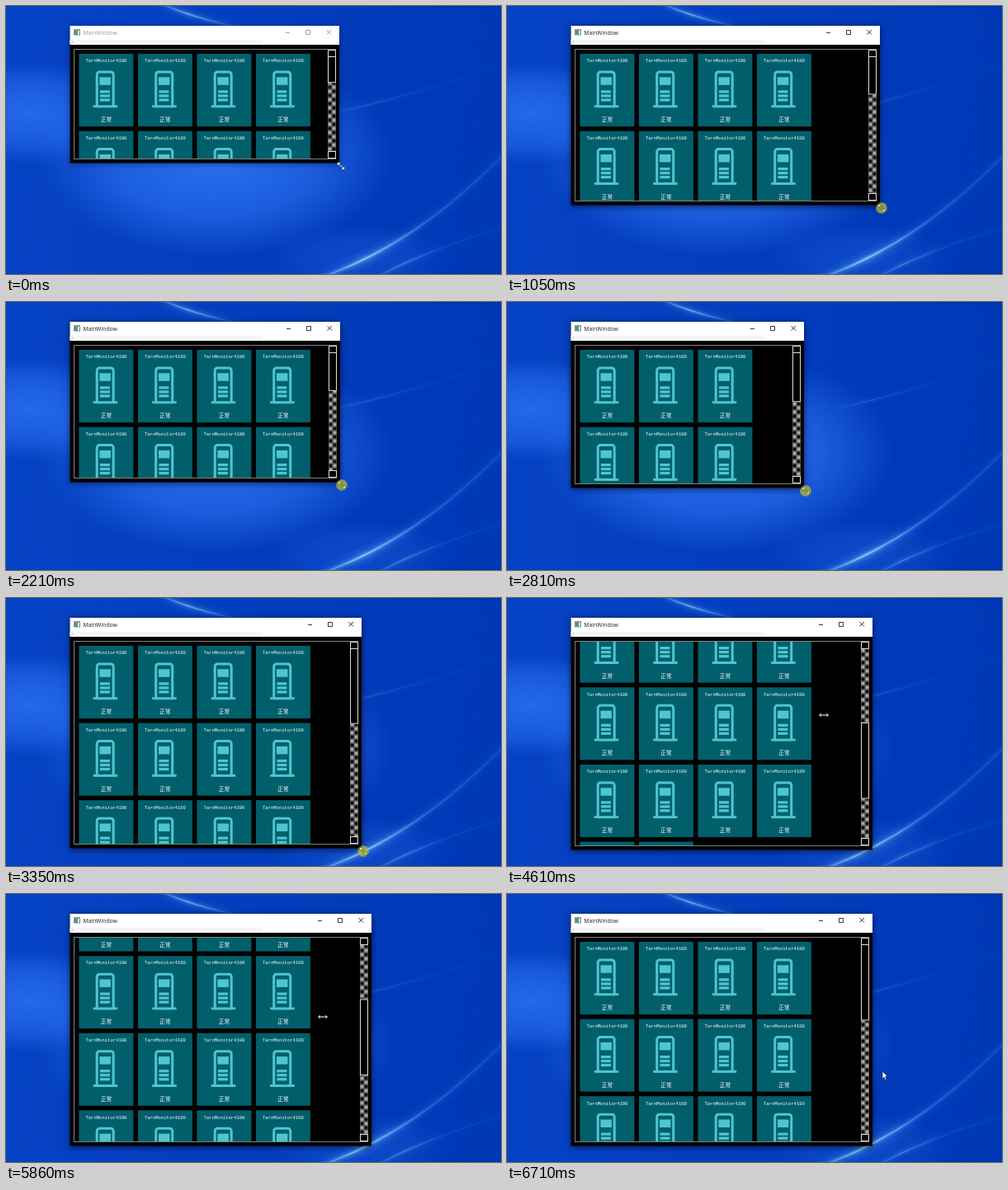
These frames come from a looping animation (600 by 325 pixels, 7170 ms). An HTML page with a canvas:

```html
<!DOCTYPE html>
<html lang="en">
<head>
<meta charset="utf-8">
<title>MainWindow</title>
<style>
  html, body { margin: 0; width: 100%; height: 100%; overflow: hidden; background: #0640c8; }
  canvas { display: block; }
</style>
</head>
<body>
<canvas id="stage" width="600" height="325"></canvas>
<script>
const LOOP = 7170, STEP = 76.6, PHASE = 52;
const LEFT = 77.5, TOP = 24, TILES = 22, PITCH_X = 71.5, PITCH_Y = 93.6, MAX_SCROLL = 352;
const PRESS = 664, RELEASE = 3592;
const ctx = document.getElementById('stage').getContext('2d');

const sampled = t => Math.max(0, PHASE + STEP * Math.floor((t - PHASE) / STEP));

function ramp(t, from, to) {
  const u = Math.min(1, Math.max(0, (t - from) / (to - from)));
  return u * u * (3 - 2 * u);
}

// Dragging the corner: out, back in, out again.
const windowRight = t => Math.floor(
  404.5 + 115.5 * ramp(t, 560, 1660) - 171 * ramp(t, 1824, 2430) + 94.5 * ramp(t, 2600, 3565));
const windowBottom = t => Math.round(
  190 + 94 * ramp(t, 560, 1480) - 98 * ramp(t, 1824, 2430) + 119 * ramp(t, 2430, 3425));
const scrollAt = t => MAX_SCROLL * (ramp(t, 4000, 4945) - ramp(t, 5480, 6100));
const pageRatio = t => .28 + .122 * ramp(t, 1824, 2700);

function pointerAt(t) {
  const enter = ramp(t, RELEASE, 4290), nudge = ramp(t, 4920, 5140), leave = ramp(t, 6470, 6639);
  return [442 - 58 * enter + 71 * leave, 308 - 166 * enter + 7 * nudge + 66 * leave];
}

function layer(w, h, paint) {
  const c = document.createElement('canvas');
  c.width = w;
  c.height = h;
  paint(c.getContext('2d'));
  return c;
}

function box(x, y, w, h, color, g = ctx) {
  g.fillStyle = color;
  g.fillRect(x, y, w, h);
}

function frame(x, y, w, h, color) {
  ctx.strokeStyle = color;
  ctx.lineWidth = 1;
  ctx.strokeRect(x, y, w, h);
}

function label(text, x, y, font, color, align = 'center') {
  ctx.font = font;
  ctx.fillStyle = color;
  ctx.textAlign = align;
  ctx.fillText(text, x, y);
}

const wallpaper = layer(600, 325, g => {
  const base = g.createLinearGradient(0, 0, 600, 60);
  base.addColorStop(0, '#0643c4');
  base.addColorStop(1, '#0038b6');
  box(0, 0, 600, 325, base, g);

  function glow(x, y, rx, ry, alpha) {
    g.save();
    g.translate(x, y);
    g.scale(rx, ry);
    const r = g.createRadialGradient(0, 0, 0, 0, 0, 1);
    r.addColorStop(0, `rgba(50,122,250,${alpha})`);
    r.addColorStop(.6, `rgba(50,122,250,${alpha * .6})`);
    r.addColorStop(1, 'rgba(50,122,250,0)');
    box(-1, -1, 2, 2, r, g);
    g.restore();
  }
  glow(255, 182, 215, 122, .85);
  glow(30, 130, 130, 62, .7);
  glow(430, 305, 110, 40, .25);

  function streak(x0, y0, cx, cy, x1, y1, width, alpha) {
    const c = g.createLinearGradient(x0, y0, x1, y1);
    c.addColorStop(0, `rgba(110,190,255,${alpha * .5})`);
    c.addColorStop(.2, `rgba(150,220,255,${alpha})`);
    c.addColorStop(.55, `rgba(70,150,255,${alpha * .4})`);
    c.addColorStop(1, `rgba(60,140,255,${alpha * .2})`);
    g.strokeStyle = c;
    g.lineCap = 'round';
    for (const k of [11, 6, 3, 1]) {
      g.globalAlpha = k > 1 ? .9 / k : 1;
      g.lineWidth = width * k;
      g.beginPath();
      g.moveTo(x0, y0);
      g.quadraticCurveTo(cx, cy, x1, y1);
      g.stroke();
    }
    g.globalAlpha = 1;
  }
  streak(385, 328, 500, 287, 605, 178, 1.8, .85);
  streak(450, 328, 520, 292, 605, 268, 1, .35);
  streak(190, -2, 255, 26, 350, 36, 1.4, .6);
  streak(400, 129, 480, 112, 605, 70, 1, .14);
});

const checker = ctx.createPattern(layer(10, 10, g => {
  const wave = v => Math.sin((v + .5) * Math.PI / 5);
  for (let x = 0; x < 10; x++)
    for (let y = 0; y < 10; y++) {
      const v = 90 + 100 * wave(x) * wave(y);
      box(x, y, 1, 1, `rgb(${v},${v},${v})`, g);
    }
}), 'repeat');

function drawTile(x, y) {
  const teal = '#005f6b', cyan = '#4fc6cf';
  box(x, y, 66, 88, teal);
  label('TarnMonitor4100', x + 33, y + 10.3, '5.55px "Liberation Mono", monospace', '#fff');
  label('正常', x + 33, y + 82, '500 6.6px "Noto Sans CJK SC", "Noto Sans CJK", sans-serif', '#fff');
  ctx.strokeStyle = cyan;
  ctx.lineWidth = 3;
  ctx.beginPath();
  ctx.roundRect(x + 21.8, y + 22, 20, 44, 3);
  ctx.stroke();
  box(x + 17.3, y + 62.3, 29.5, 3, cyan);
  box(x + 17.3, y + 65.3, 29.5, 3, teal);
  box(x + 25, y + 28.3, 13.5, 9.5, cyan);
  for (let i = 0; i < 3; i++) box(x + 25.5, y + 44.3 + i * 5, 12, 3.3, cyan);
}

function drawTitleBar(right, active) {
  const ink = active ? '#222' : '#999';
  box(LEFT, TOP, right - LEFT, 23, '#fff');
  box(LEFT, 41, Math.min(right, 311) - LEFT, 5.5, '#f5f7f7');
  box(80, 43, 1.5, 1, '#aaa');
  box(82, 28, 8, 7.5, '#8a9599');
  box(83, 30, 3.5, 4.5, '#3f9c98');
  box(87, 30, 2, 4.5, '#dfe6e8');
  label('MainWindow', 93.2, 34.7, '6.85px "Open Sans", sans-serif', ink, 'left');
  ctx.strokeStyle = ink;
  ctx.lineWidth = .9;
  ctx.beginPath();
  ctx.moveTo(right - 65, 32.5);
  ctx.lineTo(right - 60, 32.5);
  ctx.rect(right - 40.5, 29.5, 5, 5);
  ctx.moveTo(right - 15.5, 29);
  ctx.lineTo(right - 10, 34.5);
  ctx.moveTo(right - 10, 29);
  ctx.lineTo(right - 15.5, 34.5);
  ctx.stroke();
}

function drawScrollBar(x, bottom, ratio, scroll) {
  const start = 61, track = bottom - 9 - start;
  const thumb = track * ratio;
  const y = start + (track - thumb) * scroll / MAX_SCROLL;
  ctx.save();
  ctx.translate(x, start);
  box(0, 0, 10, track, checker);
  ctx.restore();
  for (const [top, h] of [[53, 9], [y, thumb], [bottom - 9, 9]]) {
    box(x, top, 10, h, '#000');
    frame(x + .5, top + .5, 9, h - 1, '#ddd');
  }
}

function drawWindow(right, bottom, ratio, scroll, active) {
  ctx.save();
  ctx.shadowColor = `rgba(0,0,30,${active ? .65 : .4})`;
  ctx.shadowBlur = 8;
  ctx.shadowOffsetY = 1;
  box(LEFT, TOP, right - LEFT, bottom - TOP + .5, '#000');
  ctx.restore();
  drawTitleBar(right, active);

  const cols = Math.max(1, Math.floor((right - 97.4) / PITCH_X));
  ctx.save();
  ctx.beginPath();
  ctx.rect(83, 53, right - 98, bottom - 58);
  ctx.clip();
  for (let i = 0; i < TILES; i++)
    drawTile(88.4 + i % cols * PITCH_X, 58 + Math.floor(i / cols) * PITCH_Y - scroll);
  ctx.restore();
  frame(82.5, 52.5, right - 87, bottom - 57, '#7c8284');
  drawScrollBar(right - 14, bottom - 5, ratio, scroll);
}

function drawResizer(x, y, angle, color) {
  const reach = 5.3;
  ctx.save();
  ctx.translate(x, y);
  ctx.rotate(angle);
  ctx.beginPath();
  for (const s of [-1, 1]) {
    ctx.moveTo(0, 0);
    ctx.lineTo(s * reach, 0);
    ctx.moveTo(s * (reach - 2), -1.8);
    ctx.lineTo(s * reach, 0);
    ctx.lineTo(s * (reach - 2), 1.8);
  }
  for (const [w, c] of [[2, 'rgba(17,17,17,.7)'], [1, color]]) {
    ctx.lineWidth = w;
    ctx.strokeStyle = c;
    ctx.stroke();
  }
  ctx.restore();
}

function drawArrow(x, y) {
  ctx.beginPath();
  ctx.moveTo(x, y);
  for (const [dx, dy] of [[0, 9], [2, 7.2], [3.5, 10.5], [5, 9.8], [3.6, 6.6], [6.2, 6.3]])
    ctx.lineTo(x + dx, y + dy);
  ctx.closePath();
  ctx.fillStyle = '#fff';
  ctx.fill();
  ctx.strokeStyle = '#222';
  ctx.lineWidth = .7;
  ctx.stroke();
}

function drawPointer(t, right, bottom) {
  if (t < RELEASE) {
    const x = right + 2, y = bottom + 4, pressed = t >= PRESS;
    if (pressed) {
      ctx.beginPath();
      ctx.arc(x, y, 6.8, 0, 7);
      ctx.fillStyle = 'rgba(178,186,52,.75)';
      ctx.fill();
    }
    drawResizer(x, y, Math.PI / 4, pressed ? '#f4f07a' : '#fff');
  } else {
    const [x, y] = pointerAt(t);
    if (x > right) drawArrow(x, y);
    else drawResizer(x, y, 0, '#fff');
  }
}

function draw(now) {
  const t = sampled(now % LOOP);
  const right = windowRight(t), bottom = windowBottom(t);
  ctx.drawImage(wallpaper, 0, 0);
  drawWindow(right, bottom, pageRatio(t), scrollAt(t), t >= PRESS);
  drawPointer(t, right, bottom);
}

const began = performance.now();
function tick() {
  draw(performance.now() - began);
  requestAnimationFrame(tick);
}
tick();
</script>
</body>
</html>
```
